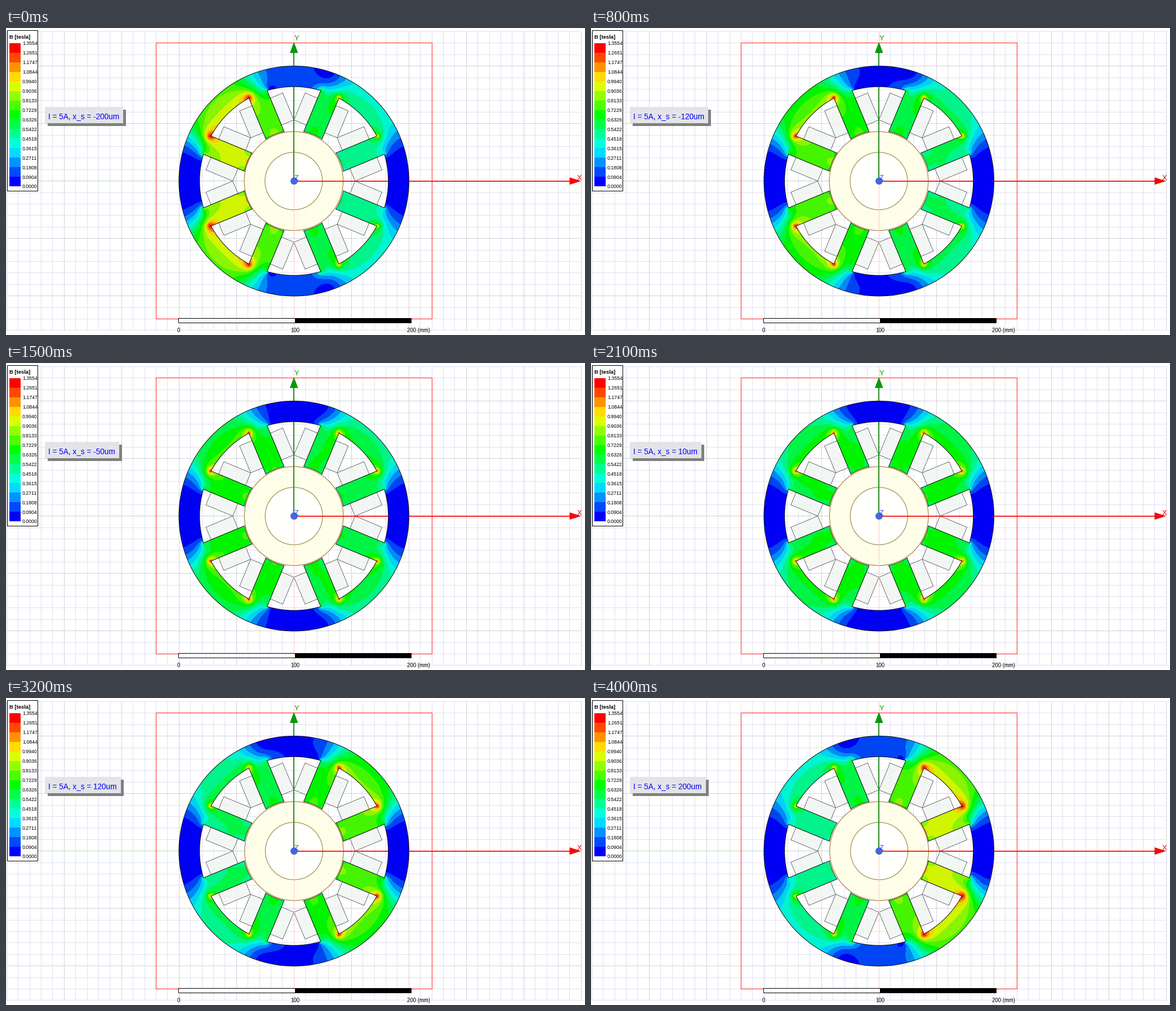
A matplotlib script that plays this animation: 1028x545 px, repeating every 4100 ms.

```python
import colorsys
import numpy as np
import matplotlib.pyplot as plt
from matplotlib.animation import FuncAnimation
from matplotlib.colors import ListedColormap
from matplotlib.patches import Circle, Polygon, Rectangle
from matplotlib.tri import LinearTriInterpolator, Triangulation

W, H = 1028, 545
DPI = 64
PT = 72 / DPI                       # points per pixel
CX, CY = 511.2, 271.7
MM = 2.04                           # pixels per millimetre
R_OUT, R_IN, R_FACE = 204.2, 167.5, 89.5
R_ROTOR, R_SHAFT = 87.8, 51
HALF = 17.5                         # half width of a pole
B_MIN, B_MAX = 0.00004, 1.35544
BANDS = 15
SECTOR = np.pi / 4
FONT = "Liberation Sans"

COLORS = [colorsys.hsv_to_rgb((1 - i / (BANDS - 1)) * 2 / 3, 1, 1) for i in range(BANDS)]

plt.rcParams["path.snap"] = False
fig = plt.figure(figsize=(W / DPI, H / DPI), dpi=DPI, facecolor="white")
ax = fig.add_axes([0, 0, 1, 1])
ax.set_axis_off()


def crisp(value):
    """Centre of the pixel that holds the value."""
    return np.floor(value) + 0.5


def line(x, y, color, width=1.0, z=1, **kw):
    return ax.plot(x, y, color=color, lw=width * PT, zorder=z, **kw)[0]


def box(x0, y0, x1, y1, face, edge="none", width=1.0, z=1):
    return ax.add_patch(Rectangle((x0, y0), x1 - x0, y1 - y0, fc=face, ec=edge,
                                  lw=width * PT, zorder=z))


def label(x, y, s, size, color="black", z=9, **kw):
    return ax.text(x, y, s, family=FONT, fontsize=size * PT, color=color, zorder=z, **kw)


def circle(radius, face, edge, z):
    return ax.add_patch(Circle((CX, CY), radius, fc=face, ec=edge, lw=PT, zorder=z))


def place(angle, u, v):
    """Pole coordinates (along, across) to stage pixels."""
    c, s = np.cos(angle), np.sin(angle)
    u, v = np.asarray(u), np.asarray(v)
    return CX + u * c - v * s, CY - u * s - v * c


# ---- magnetic field -------------------------------------------------------

def pole_basis(n_side=28, n_pole=20, n_yoke=20, n_leg=26):
    """Vector potential of one pole sector by finite elements:
    1 on the slot to one side, 0 on the other slot and on the rim."""
    side = np.linspace(SECTOR / 2, np.arcsin(HALF / R_IN), n_side + 1)[:-1]
    across = np.linspace(-HALF, HALF, n_pole + 1)
    phi = np.r_[-side, np.arcsin(across / R_IN), side[::-1]]
    left, right = n_side, n_side + n_pole

    r = np.linspace(R_OUT, R_IN, n_yoke + 1)[:, None]
    v_leg = np.clip(R_IN * np.sin(phi), -HALF, HALF)
    top, bottom = np.sqrt(R_IN**2 - v_leg**2), np.sqrt(R_FACE**2 - v_leg**2)
    f = np.linspace(0, 1, n_leg + 1)[1:, None]
    u = np.vstack([r * np.cos(phi), top + (bottom - top) * f])
    v = np.vstack([r * np.sin(phi), v_leg + 0 * f])

    # the face potential dips in slope at mid pole, where the gap field is weaker
    pot = np.full(u.shape, np.nan)
    pot[0] = 0
    pot[n_yoke:, :left + 1] = 0
    pot[n_yoke:, right:] = 1
    s = np.linspace(0, 1, n_pole + 1)
    pot[-1, left:right + 1] = s + 0.03 * np.sin(2 * np.pi * s)
    pot[-1, left:right + 1] = s - 0.03 * np.sin(2 * np.pi * (s - 0.5)) * -1

    ids = np.arange(u.size).reshape(u.shape)
    quads = np.stack([ids[:-1, :-1], ids[:-1, 1:], ids[1:, 1:], ids[1:, :-1]], -1)
    row, col = np.indices(quads.shape[:2])
    quads = quads[(row < n_yoke) | ((col >= left) & (col < right))]
    tris = np.r_[quads[:, [0, 1, 2]], quads[:, [0, 2, 3]]]
    used, tris = np.unique(tris, return_inverse=True)
    tris = tris.reshape(-1, 3)
    u, v, pot = u.ravel()[used], v.ravel()[used], pot.ravel()[used]
    pot[np.isclose(pot, 0)] = 0

    tu, tv = u[tris], v[tris]
    du = np.roll(tu, 1, 1) - np.roll(tu, -1, 1)
    dv = np.roll(tv, -1, 1) - np.roll(tv, 1, 1)
    twice = (tu * dv).sum(1)
    hat = np.stack([dv, du], -1) / twice[:, None, None]
    area = np.abs(twice) / 2

    stiff = np.zeros((len(u), len(u)))
    local = area[:, None, None] * np.einsum("tia,tja->tij", hat, hat)
    np.add.at(stiff, (tris[:, :, None], tris[:, None, :]), local)
    free = np.isnan(pot)
    rhs = -stiff[np.ix_(free, ~free)] @ pot[~free]
    pot[free] = np.linalg.solve(stiff[np.ix_(free, free)], rhs)

    grad = np.einsum("ti,tia->ta", pot[tris], hat) * area[:, None]
    node, weight = np.zeros((len(u), 2)), np.zeros(len(u))
    for i in range(3):
        np.add.at(node, tris[:, i], grad)
        np.add.at(weight, tris[:, i], area)
    node /= weight[:, None]
    mesh = Triangulation(u, v, tris)
    return [LinearTriInterpolator(mesh, node[:, i]) for i in range(2)]


X0, X1, Y0, Y1 = 304, 718, 65, 479
px, py = np.meshgrid(np.arange(X0, X1) + 0.5, np.arange(Y0, Y1) + 0.5)
dx, dy = px - CX, CY - py
theta = np.arctan2(dy, dx) % (2 * np.pi)
sector = np.minimum((theta // SECTOR).astype(int), 7)
offset = theta - (sector + 0.5) * SECTOR
radius = np.hypot(dx, dy)
pu, pv = radius * np.cos(offset), radius * np.sin(offset)
grad_u, grad_v = pole_basis()
upper = 2 * HALF * grad_u(pu, pv), 2 * HALF * grad_v(pu, pv)
lower = 2 * HALF * grad_u(pu, -pv), -2 * HALF * grad_v(pu, -pv)


def flux_density(shift):
    def pair(x):
        return 1 / (1.55 + 0.00235 * x)

    a_left, a_right, top = pair(shift), -pair(-shift), -0.13 * shift / 200
    slots = np.array([0, a_right, top, a_left, 0, a_left, top, a_right])
    hi, lo = slots[(sector + 1) % 8], slots[sector]
    b = np.ma.sqrt((hi * upper[0] + lo * lower[0])**2 + (hi * upper[1] + lo * lower[1])**2)
    # iron saturates towards the top of the scale
    return np.ma.where(b < 0.75, b, 0.75 + 0.55 * np.tanh((b - 0.75) / 0.55))


# ---- static scene ---------------------------------------------------------

def draw_grid():
    step = 10 * MM
    gx, gy = 25 * step, 13 * step
    for major in (False, True):
        color = "#d2d2da" if major else "#e0e0f4"
        for k in range(-25, 26):
            if (k % 5 == 0) == major:
                line([crisp(CX + k * step)] * 2, [CY - gy, CY + gy], color, z=1 + 0.1 * major)
                if abs(k) <= 13:
                    line([CX - gx, CX + gx], [crisp(CY + k * step)] * 2, color,
                         z=1 + 0.1 * major)
    line([CX - gx, CX], [crisp(CY)] * 2, "#b9dcc6", z=1.3)
    line([crisp(CX)] * 2, [CY - gy, CY + gy], "#ffc4c4", z=3.5)


def draw_machine():
    corner = np.arcsin(HALF / R_IN)
    face_u = np.sqrt(R_FACE**2 - HALF**2)
    for k in range(8):
        angle = (k + 0.5) * SECTOR
        for sign in (-1, 1):
            x, y = place(angle, [100.3, 152, 152, 100.3],
                         sign * np.array([HALF, HALF, 41.5, 41.5]))
            ax.add_patch(Polygon(np.c_[x, y], fc=(0.945, 0.96, 0.95, 0.8), ec="#505050",
                                 lw=0.8 * PT, zorder=2))
        arc = np.linspace(corner, SECTOR - corner, 30)
        u = np.r_[face_u, R_IN * np.cos(arc)]
        v = np.r_[HALF, R_IN * np.sin(arc)]
        x, y = place(angle, u, v)
        xe, ye = place(angle + SECTOR, face_u, -HALF)
        line(np.r_[x, xe], np.r_[y, ye], "#101010", z=5)
        face = np.linspace(-1, 1, 15) * np.arcsin(HALF / R_FACE)
        line(*place(angle, R_FACE * np.cos(face), R_FACE * np.sin(face)), "#30301a", z=5)
    circle(R_OUT, "none", "#101010", 5)


def draw_axes():
    half = 120 * MM
    box(*crisp(np.array([CX - half, CY - half, CX + half, CY + half + 1e-6])),
        "none", "#ff2020", z=2)
    # the iron hides the axis lines
    line([511, 511], [CY, 42], "#008000", 1.7, z=3.6)
    line([CX, 1003], [272, 272], "#ff0000", 1.7, z=3.6)
    ax.add_patch(Polygon([(511.2, 26), (504.5, 44), (518, 44)], fc="#00a000",
                         ec="#006000", lw=0.6 * PT, zorder=6))
    ax.add_patch(Polygon([(1020, CY), (1001, CY - 6), (1001, CY + 6)], fc="#ff0000",
                         ec="#c00000", lw=0.6 * PT, zorder=6))
    ax.add_patch(Circle((511.5, CY), 6, fc="#4169e1", ec="#2c50c0", lw=0.6 * PT, zorder=7))
    for x, y, s, color in ((516, 18.5, "Y", "#00a000"), (1018, 267, "X", "#ff0000"),
                           (515.5, 267, "Z", "#3050ff")):
        label(x, y, s, 13, color, ha="center", va="center")


def draw_scale_bar():
    box(306.5, 515.5, 513.5, 523.5, "white", "black", z=4)
    box(513, 515, 720, 524, "black", z=4)
    for x, s in ((306, "0"), (513, "100"), (732.5, "200 (mm)")):
        label(x, 540.5, s, 9.6, ha="center", va="baseline")


def draw_legend():
    box(2.5, 4.5, 56.5, 289.5, "white", "black", z=4)
    label(5.5, 19, "B [tesla]", 9.4, weight="bold")
    top, height = 27, 254 / BANDS
    for i in range(BANDS + 1):
        y = top + i * height
        if i < BANDS:
            box(6, round(y), 26, round(y + height), COLORS[BANDS - 1 - i], z=5)
        value = B_MAX + (B_MIN - B_MAX) * i / BANDS
        label(29, y + 3.5, f"{value:.4f}", 8.8)


draw_grid()
draw_machine()
draw_axes()
draw_scale_bar()
draw_legend()

# ---- moving parts ---------------------------------------------------------

field = ax.imshow(flux_density(0), cmap=ListedColormap(np.array(COLORS) * 0.96),
                  vmin=B_MIN, vmax=B_MAX, extent=(X0, X1, Y1, Y0), aspect="auto",
                  interpolation="nearest", zorder=4)
rotor = [circle(R_ROTOR, (1, 1, 0.9, 0.85), "#9a6a20", 3),
         circle(R_SHAFT, (1, 1, 1, 0.85), "#8a7a28", 3.1)]
shadow = box(74, 145, 214, 174, "#808080", z=7)
panel = box(69, 140, 209, 169, "#e4e4e8", z=7.1)
caption = label(75.2, 161.3, "", 13.65, "#0000ff")

ax.set_xlim(0, W)
ax.set_ylim(H, 0)


def update(frame):
    shift = -200 + 10 * frame
    field.set_data(flux_density(shift))
    for part in rotor:
        part.center = (CX + shift / 1000 * MM, CY)
    caption.set_text(f"I = 5A, x_s = {shift}um")
    width = round(caption.get_window_extent().x1 + 7 - 69)
    panel.set_width(width)
    shadow.set_width(width)
    return [field, *rotor, shadow, panel, caption]


anim = FuncAnimation(fig, update, frames=41, interval=100, repeat=True)
plt.show()
```
